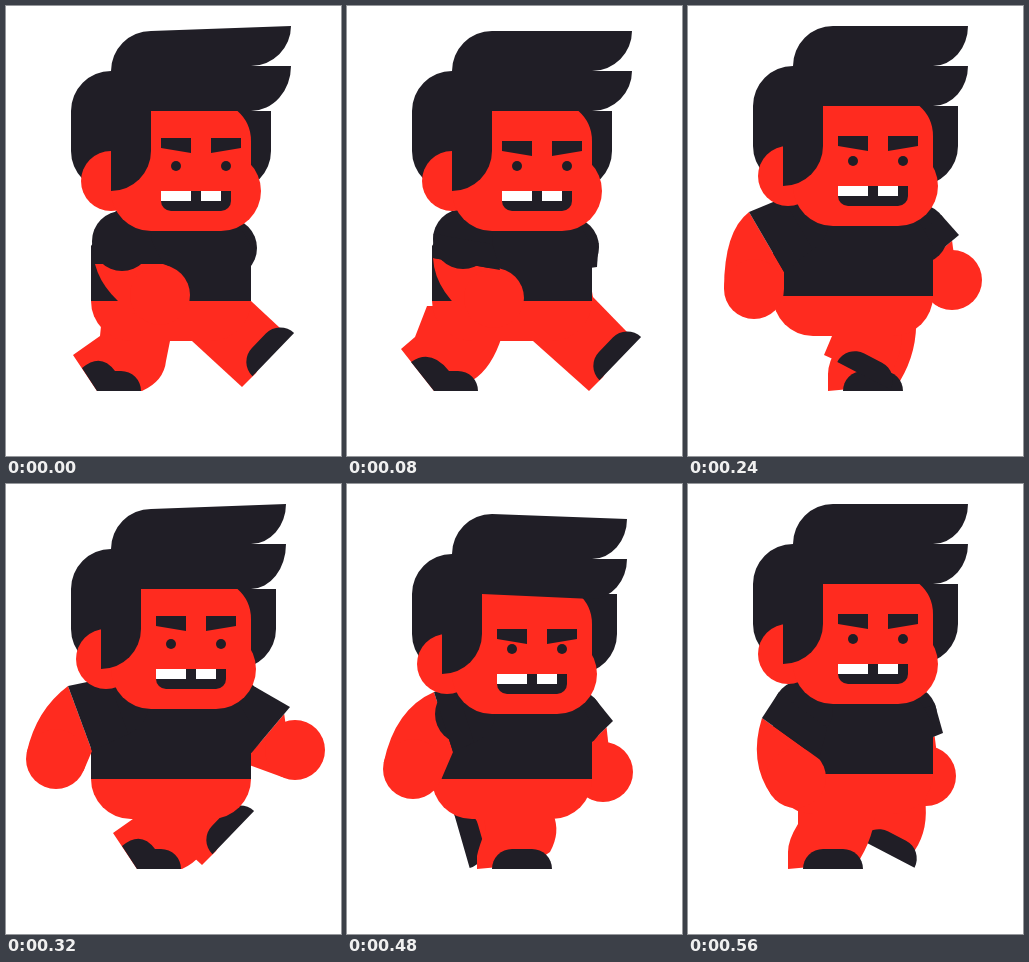
Recreate the animation shown at these times as an HTML page. Size 335 by 450 pixels, loop 0.64 s.

```html
<!DOCTYPE html>
<html lang="en">
<head>
<meta charset="utf-8">
<title>Walk cycle</title>
<style>
html, body { margin: 0; width: 100%; height: 100%; overflow: hidden; background: #fff; }
svg { display: block; width: 100vw; height: 100vh; }
</style>
</head>
<body>
<svg id="stage" viewBox="0 0 335 450"></svg>
<script>
const RED = '#ff2b1f', INK = '#201e26';
const STEP = 80, COUNT = 8, HAND = 30;
const stage = document.getElementById('stage');

const path = (d, fill) => `<path d="${d}" fill="${fill}"/>`;
const disc = (x, y, r, fill) => `<circle cx="${x}" cy="${y}" r="${r}" fill="${fill}"/>`;
const box = (x, y, w, h, fill, r = 0) =>
  `<rect x="${x}" y="${y}" width="${w}" height="${h}" rx="${r}" fill="${fill}"/>`;

// One stride of a leg; the other leg runs half a cycle later.
// foot: heel x, heel y, angle. shoe: bent shoe outline.
const STRIDE = [
  { leg: 'M175 300L186 335 236 381 250 367 262 345 274 322 245 295Z', foot: [236, 381, -46] },
  { leg: 'M175 300L186 335 242 385 256 371 268 350 281 327 245 290Z', foot: [242, 385, -46] },
  { leg: 'M170 385V372Q172 362 179 345L176 330H246Q254 348 243 368L225 380Z', foot: [170, 385, 0] },
  { leg: 'M140 385V368Q140 356 150 340V310H228Q230 345 212 375L195 380Z', foot: [140, 385, 0] },
  { leg: 'M134 330L107 349 131 385H176Q198 375 200 355L204 335V300H137Z',
    shoe: 'M116 362L131 385H175A20 20 0 0 0 155 365H149Q135 346 116 362Z' },
  { leg: 'M108 331L94 343 127 385H155L166 374Q185 362 195 330V300H120Z',
    shoe: 'M104 356L127 385H171A20 20 0 0 0 151 365H142Q124 342 104 356Z' },
  { leg: 'M115 307L102 312 107 330 128 375 133 376Q170 370 181 350L189 335V300Z', foot: [102, 312, 74] },
  { leg: 'M168 330L160 349 180 358 215 365 227 366Q241 345 237 315V300H168Z', foot: [160, 349, 27.5] }
];

// Near arm: shoulder, outer hem, inner hem, elbow control, hand
const NEAR = [
  [[116, 235], [89, 258], [157, 258], [97, 290], [154, 289]],
  [[116, 233], [86, 252], [153, 264], [88, 288], [147, 292]],
  [[118, 230], [79, 240], [141, 271], [73, 282], [123, 297]],
  [[110, 218], [61, 206], [96, 266], [36, 225], [66, 283]],
  [[112, 222], [62, 202], [86, 267], [30, 226], [50, 275]],
  [[112, 225], [67, 205], [85, 270], [32, 230], [52, 278]],
  [[118, 230], [87, 208], [106, 268], [48, 225], [66, 285]],
  [[115, 226], [74, 234], [131, 275], [60, 278], [108, 294]]
];

// Far arm: shoulder, outer hem, hem direction in degrees, hand
const FAR = [
  [[221, 242], [245, 262], 0, [210, 290]],
  [[222, 241], [250, 261], -8, [213, 292]],
  [[226, 237], [265, 257], -17, [239, 294]],
  [[230, 228], [271, 229], -40, [264, 274]],
  [[230, 226], [284, 223], -50, [289, 266]],
  [[230, 229], [277, 230], -47, [275, 275]],
  [[226, 235], [266, 237], -44, [256, 288]],
  [[219, 231], [255, 249], -22, [238, 292]]
];

// Point where a line from p touches the hand circle
function tangent([px, py], [hx, hy], side) {
  const dx = px - hx, dy = py - hy;
  const a = Math.atan2(dy, dx) + side * Math.acos(Math.min(1, HAND / Math.hypot(dx, dy)));
  return [hx + HAND * Math.cos(a), hy + HAND * Math.sin(a)];
}

// Round shoulder joined to a straight hem
function sleeve([x, y], a, b) {
  const len = Math.hypot(a[0] - b[0], a[1] - b[1]);
  const ux = 30 * (a[0] - b[0]) / len, uy = 30 * (a[1] - b[1]) / len;
  return disc(x, y, 30, INK) +
    path(`M${a}L${[x + ux, y + uy]} ${[x - ux, y - uy]} ${b}Z`, INK);
}

function leg(phase, near) {
  const { leg, foot, shoe } = STRIDE[phase];
  const shift = !near ? 0 : phase < 6 ? -40 : -24;
  const black = shoe ? path(shoe, INK) :
    `<g transform="translate(${foot[0]} ${foot[1]}) rotate(${foot[2]})">` +
    path('M15 0A20 20 0 0 1 35-20H55A20 20 0 0 1 75 0Z', INK) + '</g>';
  return `<g transform="translate(${shift})">${path(leg, RED)}${black}</g>`;
}

function nearArm([s, a, b, c, h]) {
  return path(`M${a}Q${c} ${tangent(c, h, -1)}L${h} ${tangent(b, h, 1)} ${b}Z`, RED) +
    disc(...h, HAND, RED) + sleeve(s, a, b);
}

function farArm([s, a, deg, h]) {
  const ux = Math.cos(deg * Math.PI / 180), uy = Math.sin(deg * Math.PI / 180);
  const back = d => [a[0] - d * ux, a[1] - d * uy];
  const p = back(9);
  return path(`M${p}L${p[0] + 5} ${h[1]} ${h[0] - 13} ${h[1] + 27} 235 ${h[1] + 12} ${back(45)}Z`, RED) +
    disc(...h, HAND, RED) + (deg ? sleeve(s, a, back(60)) : disc(...s, 30, INK));
}

function body(waist) {
  return path(`M85 ${waist - 5}H245V${waist}a40 40 0 0 1-40 40H125a40 40 0 0 1-40-40Z`, RED) +
    path(`M110 205H225L245 240V${waist}H85V240Z`, INK);
}

function head(i) {
  const beat = i % 4, turned = i < 3;
  const t = [25, 25, 30, 20][beat], tilt = [-5, 0, 5, 0][beat];
  const tip = turned ? 285 : 280, rx = tip - 245;
  const right = turned ? 265 : 270, jaw = turned ? 255 : 250;
  const ear = turned ? 105 : 100, burn = turned ? 145 : 135;
  const x = turned ? 155 : 150, brow = t + [107, 110, 115, 110][beat];
  const lobe = t + 80 + Math.max(tilt, 0), flick = t + tilt + 40;
  return path(`M105 ${t + 40}H145V${t + 80}H${right}v40a40 40 0 0 1-40 40H105a40 40 0 0 1-40-40v-40a40 40 0 0 1 40-40Z`, INK) +
    disc(ear, t + 150, 30, RED) +
    box(105, t + 120, jaw - 105, 80, RED, 40) +
    path(`M105 ${t + 80}H231.5A40 40 0 0 1 245 ${t + 110}v50H105Z`, RED) +
    path(`M${burn - 40} ${t + 79}H${burn}v41a40 40 0 0 1-40 40Z`, INK) +
    path(`M105 ${t + 40}A40 40 0 0 1 145 ${t}L${tip} ${t + tilt}A${rx} 40 0 0 1 245 ${flick}` +
      `H${tip}A${rx} ${lobe - flick} 0 0 1 245 ${lobe}L${burn} ${t + 80}H105Z`, INK) +
    path(`M${x} ${brow}h30v15l-30-5ZM${x + 50} ${brow}h30v10l-30 5Z`, INK) +
    disc(x + 15, t + 135, 5, INK) + disc(x + 65, t + 135, 5, INK) +
    path(`M${x} ${t + 160}h70v10a10 10 0 0 1-10 10h-50a10 10 0 0 1-10-10Z`, INK) +
    box(x, t + 160, 30, 10, '#fff') + box(x + 40, t + 160, 20, 10, '#fff');
}

function draw(i) {
  const waist = i % 4 === 3 ? 290 : 295;
  stage.innerHTML = farArm(FAR[i]) + leg(i, false) + leg((i + 4) % COUNT, true) +
    body(waist) + nearArm(NEAR[i]) + head(i);
}

let shown = -1;
const start = performance.now();
function tick() {
  const i = Math.floor((performance.now() - start) / STEP) % COUNT;
  if (i !== shown) draw(shown = i);
  requestAnimationFrame(tick);
}
tick();
</script>
</body>
</html>
```
